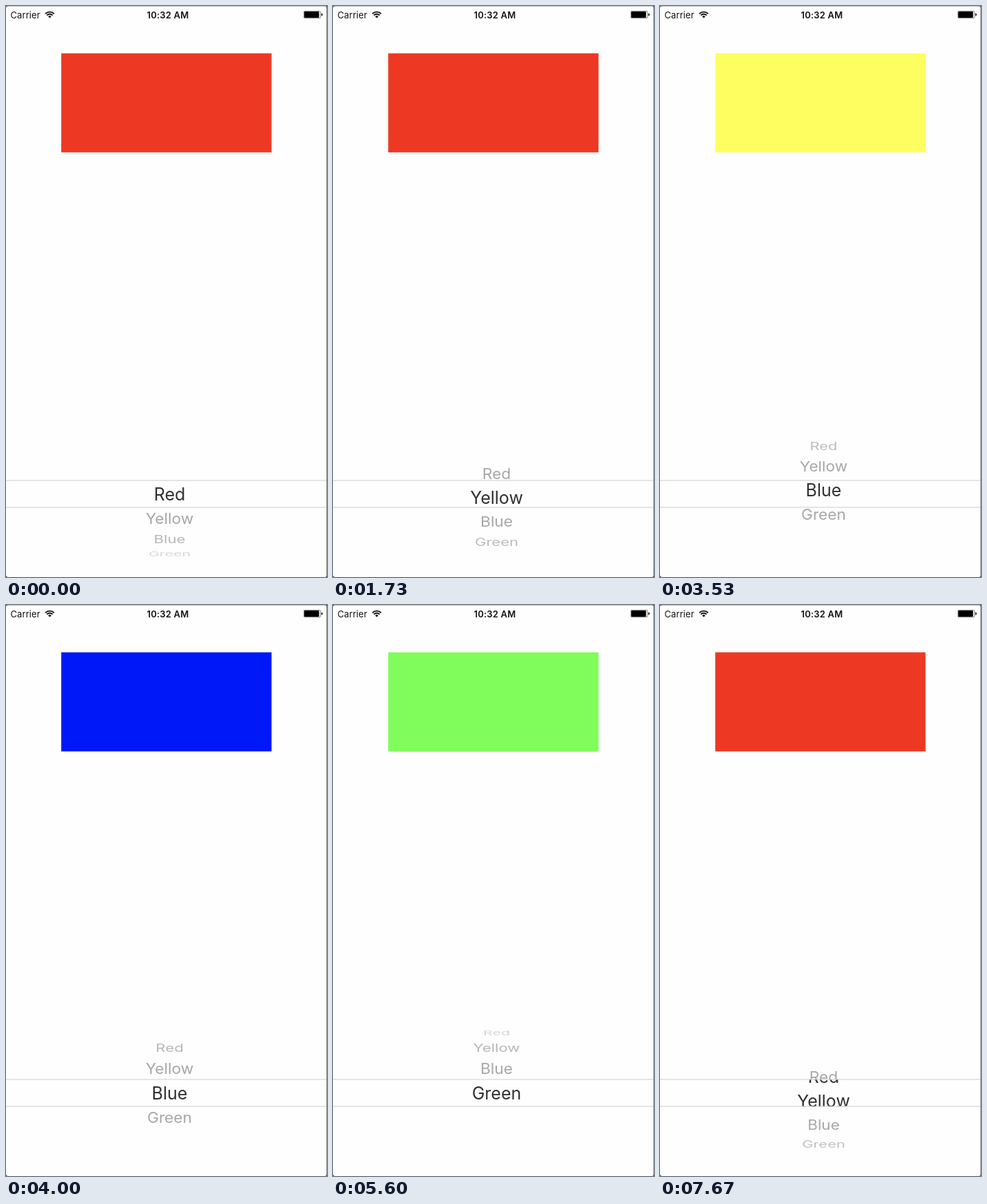
Animation of 466 by 828 pixels, one loop 8 s. Source, as an HTML page:

```html
<!DOCTYPE html>
<html lang="en">
<head>
<meta charset="utf-8">
<title>Colour picker</title>
<style>
  html, body { margin: 0; width: 100%; height: 100%; overflow: hidden; background: #fefefe; }
  svg { display: block; width: 466px; height: 828px; }
  text { font-family: Inter, Roboto, "Liberation Sans", sans-serif; }
  .status { font-size: 13px; letter-spacing: .1px; fill: #111; }
  .clock { font-weight: 600; letter-spacing: .2px; }
  .wheel text { font-size: 25px; text-anchor: middle; }
</style>
</head>
<body>
<svg viewBox="0 0 466 828">
  <defs>
    <clipPath id="band"><path d="M0 688H466V727H0Z"/></clipPath>
    <clipPath id="around"><path d="M0 560H466V688H0ZM0 727H466V828H0Z"/></clipPath>
  </defs>
  <rect width="466" height="828" fill="#fefefe"/>

  <text class="status" x="6.5" y="17.5">Carrier</text>
  <g fill="none" stroke="#111" stroke-width="1.9">
    <path d="M57.2 11.2A9 9 0 0 1 69.8 11.2"/>
    <path d="M59.4 13.5A5.8 5.8 0 0 1 67.6 13.5"/>
  </g>
  <path d="M63.5 17.6L61.2 15.2A3.2 3.2 0 0 1 65.8 15.2Z" fill="#111"/>
  <text class="status clock" x="235" y="17.5" text-anchor="middle">10:32 AM</text>
  <rect x="432.3" y="7.3" width="24.4" height="10.4" rx="1.8" fill="none" stroke="#555" stroke-width=".7"/>
  <rect x="433" y="8" width="21.5" height="9" rx="1" fill="#000"/>
  <path d="M457.7 10.5a2 2 0 0 1 0 4Z" fill="#222"/>

  <rect id="swatch" x="80.2" y="68.6" width="305.3" height="143.7"/>

  <g id="outer" class="wheel" clip-path="url(#around)"></g>
  <g id="inner" class="wheel" clip-path="url(#band)" fill="#303030"></g>
  <path d="M0 688H466M0 727H466" stroke="#cdcdcd" stroke-width="1.2"/>

  <path d="M0 .5H466" stroke="#c4c4c4"/>
  <path d="M465.5 0V828" stroke="#8c8c8c"/>
  <path d="M0 0H3Q0 0 0 3ZM466 0H463Q466 0 466 3ZM0 828H3Q0 828 0 825ZM466 828H463Q466 828 466 825Z" fill="#222"/>
</svg>
<script>
const LOOP = 8000;
const ROWS = [
  { name: "Red", fill: "#ed3924" },
  { name: "Yellow", fill: "#fffe61" },
  { name: "Blue", fill: "#0018f7" },
  { name: "Green", fill: "#80fd5b" }
];
const RADIUS = 97, STEP = 0.37, CX = 237.5, CY = 707.8;

const drag = (tick, length, to) => ({ tick, length, to });
// A released wheel snaps to a row within two ticks, then selects it.
const settle = (tick, row) => ({ tick, length: 2, to: row, selects: true });

const MOVES = [
  drag(15, 6, .33), drag(22, 5, .85), settle(34, 1),
  drag(46, 8, 2.17), settle(55, 2),
  drag(67, 4, 3.03), drag(75, 4, 3.2), settle(79, 3),
  drag(94, 6, -.28), settle(100, 0),
  drag(114, 2, .675)
];

const byId = id => document.getElementById(id);
const swatch = byId("swatch");

function addLabels(group) {
  return ROWS.map(row => {
    const label = document.createElementNS("http://www.w3.org/2000/svg", "text");
    label.setAttribute("y", 9.1);
    label.textContent = row.name;
    group.appendChild(label);
    return label;
  });
}
const outer = addLabels(byId("outer"));
const inner = addLabels(byId("inner"));

// 15 ticks per second, each starting on a time rounded to 10 ms.
const tickStart = k => 10 * Math.round(k * 20 / 3);
function tickAt(t) {
  const k = Math.round(t * 3 / 200);
  return tickStart(k) > t ? k - 1 : k;
}

const smooth = p => p * p * (3 - 2 * p);

function stateAt(k) {
  let pos = 0, selected = 0;
  for (const { tick, length, to, selects } of MOVES) {
    if (k < tick) break;
    const p = Math.min(1, (k - tick + 1) / length);
    pos += (to - pos) * smooth(p);
    if (selects && p === 1) selected = to;
  }
  return { pos, selected };
}

function place(label, y, sx, sy) {
  label.setAttribute("transform", `translate(${CX} ${y}) scale(${sx} ${sy})`);
}

function draw(k) {
  const { pos, selected } = stateAt(k);
  swatch.setAttribute("fill", ROWS[selected].fill);
  ROWS.forEach((row, i) => {
    const d = i - pos, depth = Math.cos(d * STEP);
    const y = CY + RADIUS * Math.sin(d * STEP);
    const size = .915 / (1 + .126 * (1 - depth));
    place(outer[i], y, size, size * depth);
    outer[i].setAttribute("opacity", .34 - .12 * Math.max(0, Math.abs(d) - 1.5));
    place(inner[i], y, 1, depth);
  });
}

const start = performance.now();
let shown = -1;
function loop() {
  const k = tickAt((performance.now() - start) % LOOP);
  if (k !== shown) draw(shown = k);
  requestAnimationFrame(loop);
}
loop();
</script>
</body>
</html>
```
